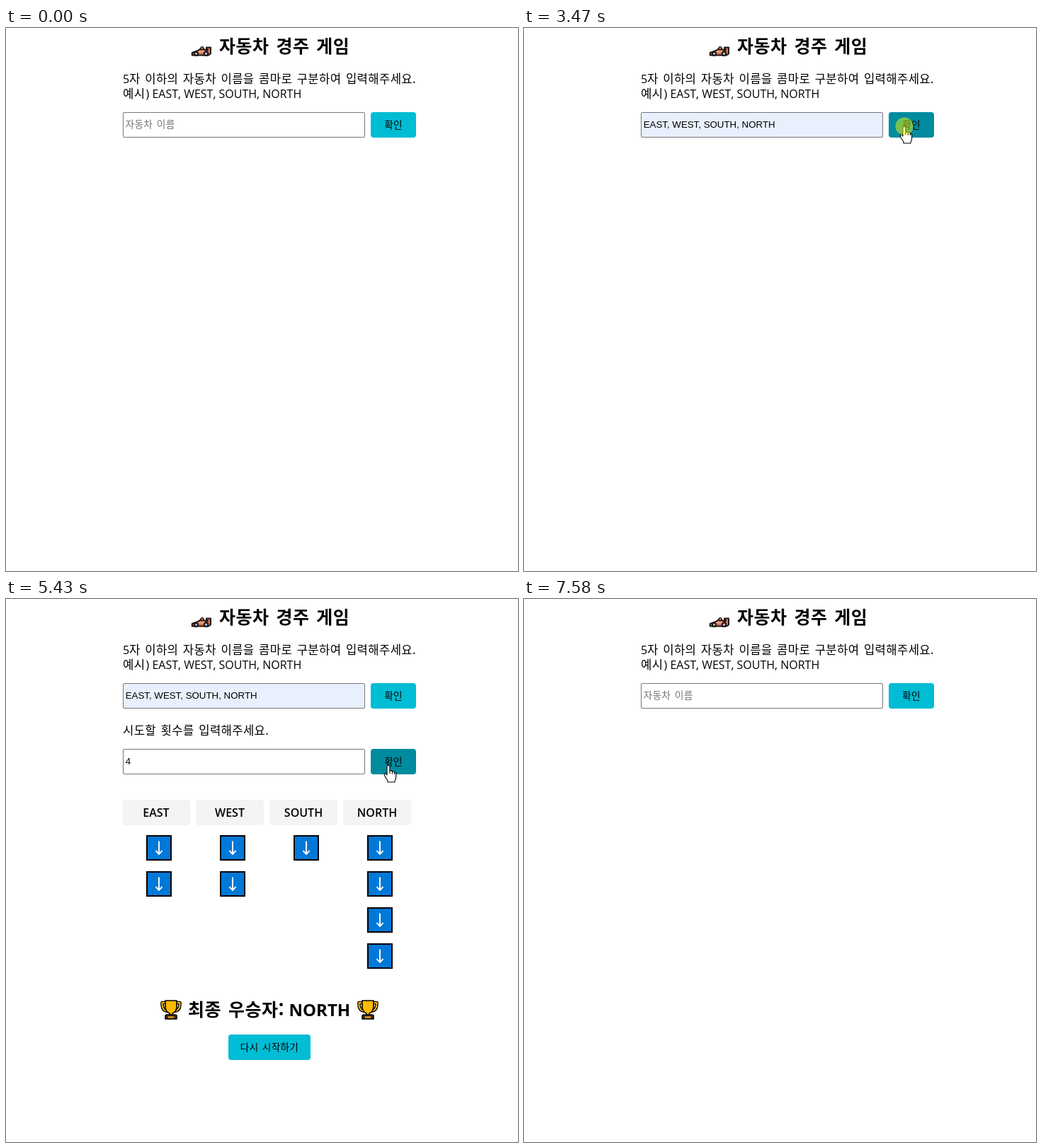
These frames come from a looping animation (723 by 768 pixels, 8360 ms). An HTML page:

```html
<!DOCTYPE html>
<html lang="ko">
<head>
<meta charset="utf-8">
<title>자동차 경주 게임</title>
<style>
html, body { margin: 0; width: 100%; height: 100%; overflow: hidden; background: #fff; }
svg { display: block; }
text { font-family: "Open Sans", "Noto Sans", sans-serif; font-kerning: none; white-space: pre; }
.ko { font-family: "Noto Sans CJK KR", "Noto Sans CJK", sans-serif; font-weight: 350; letter-spacing: .02em; word-spacing: .095em; }
.field { font-family: "Liberation Sans", Arial, sans-serif; font-kerning: normal; }
.bold { font-weight: 700; }
.semi { font-weight: 600; }
.mid { text-anchor: middle; }
.hint { fill: #757575; }
#list { filter: drop-shadow(0 1px 1.5px rgba(0, 0, 0, .38)); }
</style>
</head>
<body>
<svg id="stage" width="723" height="768" viewBox="0 0 723 768"></svg>
<script>
const LOOP = 8360;
const NAMES = ['EAST', 'WEST', 'SOUTH', 'NORTH'];
const SCORES = [2, 2, 1, 4];
const ALL = NAMES.join(', ');
const CYAN = '#00bcd4', DARK_CYAN = '#008c9e';
const stage = document.getElementById('stage');

const latin = (x, y, size, str, cls = '') =>
  `<text x="${x}" y="${y}" font-size="${size}" class="${cls}">${str}</text>`;
const korean = (x, y, size, str, cls = '') =>
  latin(x, y, size * 1.043, str, 'ko ' + cls);
const rect = (x, y, w, h, r, fill, rest = '') =>
  `<rect x="${x}" y="${y}" width="${w}" height="${h}" rx="${r}" fill="${fill}" ${rest}/>`;
const group = (id, body) => `<g id="${id}">${body}</g>`;

const button = (id, x, y, w, label) =>
  rect(x, y, w, 36, 4, CYAN, `id="${id}"`) + korean(x + w / 2, y + 23.3, 13.1, label, 'mid');
const input = (id, y) =>
  rect(165.5, y + .5, 341, 35, 1.5, '#fff', `id="${id}" stroke="#767676"`) +
  rect(166, y + 1, 340, 34, 2, 'none', `id="${id}Focus" stroke="#101010" stroke-width="2"`);
const caret = (id, x, y, fill = '#000') => rect(x, y, 1, 15, 0, fill, `id="${id}"`);

const trophy = x => `<g transform="translate(${x} 581)" stroke="#000" stroke-width="1.6" stroke-linejoin="round">
  <path d="M-7-10H-12.5V-7Q-12 1-5 2M7-10H12.5V-7Q12 1 5 2" fill="none" stroke-width="4.6"/>
  <path d="M-7-10H-12.5V-7Q-12 1-5 2M7-10H12.5V-7Q12 1 5 2" fill="none" stroke="#ffb900" stroke-width="2"/>
  <path d="M-8-13H8V-5Q8 3 2 5V8H-2V5Q-8 3-8-5Z" fill="#ffb900"/>
  <path d="M-8 13V9Q-8 7-6 7H6Q8 7 8 9V13Z" fill="#442a22"/>
  <path d="M-4 10.5H4" stroke="#ffb900" stroke-width="2"/></g>`;

const car = `<g stroke="#1c1412" stroke-width="2" stroke-linejoin="round">
  <path d="M262.8 38.5V35L271 32 274.5 29.5 280 30 283.5 32 285 30.5 283 29.5V27.5H289V36.5L286 38.5Z" fill="#d8744f"/>
  <path d="M265 35.8 272 33.6H280" stroke="#f5c8ac" fill="none" stroke-width="1.2"/>
  <circle cx="277" cy="28.6" r="1.9" fill="#e9b898" stroke-width="1.5"/>
  <g fill="#a9bde0"><circle cx="268.5" cy="36.3" r="2.6"/><circle cx="282.5" cy="36.3" r="2.8"/></g></g>`;

const tile = (x, y) => rect(x - 18, y, 36, 36, 0, '#000') + rect(x - 16, y + 2, 32, 32, 0, '#0078d7') +
  `<path d="M${x} ${y + 8.5}v18m-4.5-4.5 4.5 4.8 4.5-4.8" fill="none" stroke="#fff" stroke-width="1.9"/>`;

const lanes = NAMES.map((name, i) => {
  const left = 164 + 104 * i;
  let out = rect(left, 284, 96, 36, 4, '#f3f5f5') + latin(left + 48, 308, 16, name, 'semi mid');
  for (let k = 0; k < SCORES[i]; k++) out += tile(left + 52, 334 + 51 * k);
  return out;
}).join('');

stage.innerHTML =
  car + korean(301, 35, 24, '자동차 경주 게임', 'bold') +
  latin(165, 78, 16, '5') + korean(174, 78, 16, '자 이하의 자동차 이름을 콤마로 구분하여 입력해주세요.') +
  korean(165, 99, 16, '예시') + latin(197.5, 99, 16, ') ' + ALL) +
  input('nameBox', 119) + button('nameButton', 515, 119, 64, '확인') +
  group('nameHint', korean(168.5, 141, 13.2, '자동차 이름', 'hint')) +
  group('nameValue', latin(168.7, 141, 13.3, ALL, 'field')) +
  caret('nameCaret', 169, 129) + caret('endCaret', 355, 129, '#cdd3df') +
  group('list', rect(164, 157, 344, 51, 3, '#fff') +
    rect(164, 165, 344, 35, 0, '#e9e9ea', 'id="picked"') + latin(176, 187, 13, ALL)) +
  group('tries',
    korean(165, 192, 16, '시도할 횟수를 입력해주세요.') +
    input('tryBox', 212) + button('tryButton', 515, 212, 64, '확인') +
    group('tryHint', korean(168.5, 234, 13.2, '시도 횟수', 'hint')) +
    group('tryValue', latin(168.7, 234, 13.3, '4', 'field')) +
    caret('tryCaret', 169, 222) + caret('fourCaret', 176, 222) +
    '<path id="spinner" d="M496 227.5 498.5 224 501 227.5ZM496 231.5 498.5 235 501 231.5Z" fill="#505050"/>') +
  group('results', lanes +
    trophy(233) + korean(257, 590, 24, '최종 우승자:', 'bold') + latin(399.5, 590, 24, 'NORTH', 'bold') + trophy(511) +
    button('againButton', 314, 616, 116, '다시 시작하기')) +
  group('pointer',
    `<path id="arrow" d="M.5.5V16.5L4 13.2 6.5 18.8 9 17.8 6.6 12.2H11.5Z" fill="#fff" stroke="#000"/>
    <g id="beam" fill="none"><path d="M-3-7.5H-1Q.5-7.5.5-6Q.5-7.5 2-7.5H4M.5-7V7M-3 7.5H-1Q.5 7.5.5 6Q.5 7.5 2 7.5H4" stroke="#000" stroke-width="1.2"/></g>
    <g id="hand" stroke="#000" stroke-width="1.1" stroke-linejoin="round">
      <path d="M-2 2.5Q-2 .5 0 .5T2 2.5V8Q5 7 5.4 9Q8.2 8.3 8.5 10.2Q10.7 10 10.7 12V17Q10.7 20 9 22V24H-1V22L-5.2 15.5Q-6.5 13-4.8 12T-2 14Z" fill="#fff"/>
      <path d="M2 7V12M5.4 9V12.5M8.5 10V13" fill="none"/></g>
    <circle id="press" r="12.5" fill="#ff0" fill-opacity=".47"/>`);

// Pointer stops: time, x, y. The pointer jumps from stop to stop.
const PATH = [
  [100, 685, 723], [210, 612, 562], [320, 500, 330], [430, 418, 165], [540, 399, 137],
  [3150, 440, 138], [3260, 530, 139], [3370, 537, 139],
  [3580, 500, 168], [3690, 420, 204], [3790, 345, 227], [3900, 330, 229],
  [4560, 350, 230], [4670, 430, 233], [4770, 510, 235], [4880, 532, 235], [4990, 540, 235],
  [6510, 520, 262], [6620, 455, 380], [6730, 395, 510], [6830, 365, 600], [6940, 357, 634], [7050, 356, 642],
  [7480, 432, 672]
];

// Spans of time in which each part is visible.
const SHOW = {
  nameBoxFocus: [[650, 3370]],
  nameHint: [[0, 2050], [7260, LOOP]],
  nameValue: [[2050, 7260]],
  nameCaret: [[650, 1180], [1730, 2380]],
  endCaret: [[2380, 2930]],
  list: [[750, 2380]],
  picked: [[2050, 2380]],
  tries: [[3480, 7260]],
  tryBoxFocus: [[4120, 5210]],
  tryHint: [[3480, 4450]],
  tryValue: [[4450, 7260]],
  tryCaret: [[4120, 4450]],
  fourCaret: [[4450, 4880]],
  results: [[5320, 7260]],
  pointer: [[100, 7580]],
  press: [[650, 750], [3370, 3480], [4120, 4340], [5210, 5430], [7150, 7260]]
};

const el = id => document.getElementById(id);
const show = (id, on) => el(id).style.display = on ? '' : 'none';
const within = (t, spans) => spans.some(([a, b]) => t >= a && t < b);

function draw() {
  const t = performance.now() % LOOP;
  for (const id in SHOW) show(id, within(t, SHOW[id]));

  const [, x, y] = PATH.filter(p => p[0] <= t).pop() || [0, -50, -50];
  const over = (l, top, w) => x >= l && x < l + w && y >= top && y < top + 36;
  const tries = within(t, SHOW.tries), results = within(t, SHOW.results);
  const onTry = tries && over(165, 212, 342);
  const hover = {
    nameButton: over(515, 119, 64),
    tryButton: tries && over(515, 212, 64),
    againButton: results && over(314, 616, 116)
  };
  for (const id in hover) el(id).setAttribute('fill', hover[id] ? DARK_CYAN : CYAN);
  el('nameBox').setAttribute('fill', within(t, SHOW.nameValue) ? '#e8f0fe' : '#fff');
  show('spinner', onTry || within(t, SHOW.tryBoxFocus));

  const hand = Object.values(hover).some(Boolean), beam = onTry || over(165, 119, 342);
  show('hand', hand);
  show('beam', beam);
  show('arrow', !hand && !beam);
  el('pointer').setAttribute('transform', `translate(${x} ${y})`);
  requestAnimationFrame(draw);
}
draw();
</script>
</body>
</html>
```
